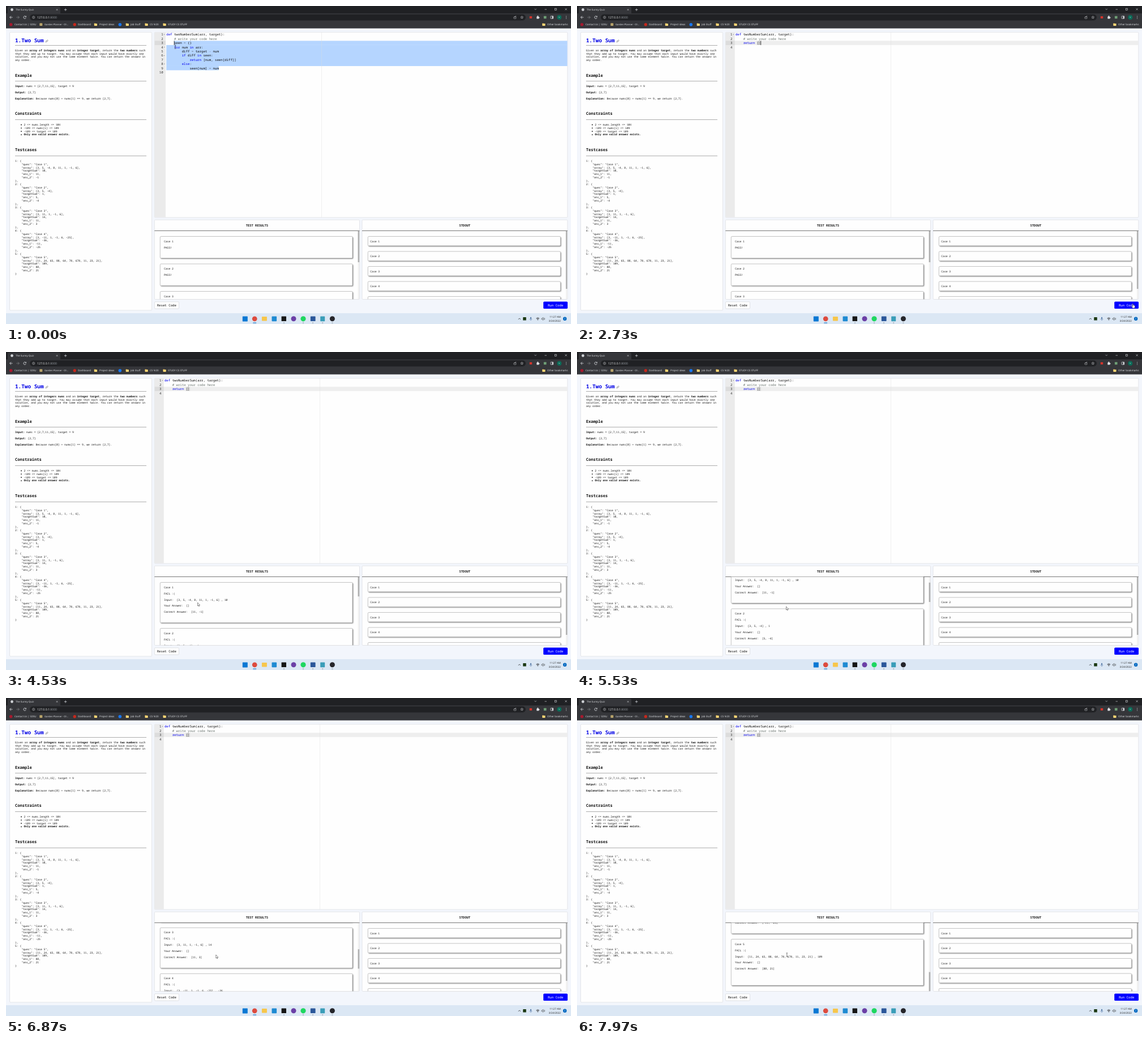
Animation, 998 px wide and 561 px high, one loop 8 s. Source, as an HTML page with a canvas:

```html
<!DOCTYPE html>
<html lang="en">
<head>
<meta charset="utf-8">
<title>Coding practice</title>
<style>
html, body { margin: 0; width: 100%; height: 100%; overflow: hidden; background: #f3f6fc; }
canvas { display: block; width: 998px; height: 561px; }
</style>
</head>
<body>
<canvas id="stage"></canvas>
<script>
const LOOP = 8000, W = 998, H = 561;
const MONO = '"Noto Sans Mono", "DejaVu Sans Mono", monospace';
const SANS = '"Open Sans", "Noto Sans", sans-serif';
const SMALL = 4.68, CODE = 5.72, ADV = CODE * 0.6, ROW = 7.42;

const canvas = document.getElementById('stage');
const ctx = canvas.getContext('2d');
const dpr = window.devicePixelRatio || 1;
canvas.width = W * dpr;
canvas.height = H * dpr;

const CASES = [
  { nums: '3, 5, -4, 8, 11, 1, -1, 6', sum: 10, ans: [11, -1] },
  { nums: '3, 5, -4', sum: 1, ans: [5, -4] },
  { nums: '3, 11, 1, -1, 6', sum: 14, ans: [11, 3] },
  { nums: '3, -11, 1, -1, 6, -25', sum: -36, ans: [-11, -25] },
  { nums: '11, 24, 65, 88, 64, 78, 678, 11, 23, 21', sum: 109, ans: [88, 21] }
];
const HEAD = ['def twoNumberSum(arr, target):', '    # write your code here'];
const SOLUTION = [...HEAD,
  '    seen = {}',
  '    for num in arr:',
  '        diff = target - num',
  '        if diff in seen:',
  '            return [num, seen[diff]]',
  '        else:',
  '            seen[num] = num',
  ''];
const TYPED = 'return []';
const KEYWORDS = /^(def|for|in|if|else|return)$/;

const DELETE_AT = 350, TYPE_AT = 550, KEY_MS = 80, BLUR_AT = 2800, RESULT_AT = 3500;
const WHEEL = [5421, 5830, 6241, 6829, 7250, 7640], WHEEL_MS = 180, NOTCH = 52, MAX_SCROLL = 305;
// time, x, y of the pointer
const PATH = [
  [0, 299, 72], [1350, 299, 72], [2100, 982, 527], [3450, 982, 527], [4250, 338.5, 442],
  [4700, 338.5, 442], [5300, 369.5, 449], [5600, 369.5, 449], [6000, 370.8, 453], [8000, 370.8, 453]
];

const ease = p => { p = Math.min(1, Math.max(0, p)); return p * p * (3 - 2 * p); };

function rect(x, y, w, h, fill) {
  ctx.fillStyle = fill;
  ctx.fillRect(x, y, w, h);
}
function round(x, y, w, h, r, fill, stroke, lw = 0.5) {
  ctx.beginPath();
  ctx.roundRect(x, y, w, h, r);
  if (fill) { ctx.fillStyle = fill; ctx.fill(); }
  if (stroke) { ctx.strokeStyle = stroke; ctx.lineWidth = lw; ctx.stroke(); }
}
function dot(x, y, r, fill) {
  ctx.beginPath();
  ctx.arc(x, y, r, 0, 7);
  ctx.fillStyle = fill;
  ctx.fill();
}
function line(points, color, lw = 0.6) {
  ctx.beginPath();
  points.forEach(([x, y], i) => i ? ctx.lineTo(x, y) : ctx.moveTo(x, y));
  ctx.strokeStyle = color;
  ctx.lineWidth = lw;
  ctx.stroke();
}
function poly(points, fill, stroke, lw = 0.5) {
  ctx.beginPath();
  points.forEach(([x, y]) => ctx.lineTo(x, y));
  ctx.closePath();
  ctx.fillStyle = fill;
  ctx.fill();
  if (stroke) { ctx.strokeStyle = stroke; ctx.lineWidth = lw; ctx.stroke(); }
}
// y is the middle of the capitals; drawn large and scaled down for exact advances
function text(s, x, y, { size = SMALL, color = '#111', bold = false, font = MONO, align = 'left' } = {}) {
  const k = 8;
  ctx.save();
  ctx.translate(x, y + size * 0.357);
  ctx.scale(1 / k, 1 / k);
  ctx.font = `${bold ? 'bold ' : ''}${size * k}px ${font}`;
  ctx.textRendering = 'geometricPrecision';
  ctx.textAlign = align;
  ctx.fillStyle = color;
  ctx.fillText(s, 0, 0);
  ctx.restore();
}
// parts between asterisks are bold
function rich(s, x, y) {
  s.split('*').forEach((part, i) => {
    text(part, x, y, { bold: i % 2 === 1 });
    x += part.length * SMALL * 0.6;
  });
}
const label = (s, x, y, color = '#e8eaed', size = 4.45, align = 'left') =>
  text(s, x, y, { color, size, align, font: SANS });

function folder(x, y) {
  round(x - 2.5, y - 2.3, 2.6, 2, 0.4, '#e0b34a');
  round(x - 2.5, y - 1.7, 5.2, 4, 0.4, '#fbd575');
}

function drawBrowser() {
  const ink = '#dfe1e5';
  rect(0, 0, W, 39.5, '#35363a');
  rect(0, 0, W, 13, '#202124');
  round(3, 1, 93, 14, [3, 3, 0, 0], '#35363a');
  dot(10.5, 6.5, 2.4, '#cfd2d6');
  label('The Sunny Quiz', 17, 6.5);
  line([[88.8, 5.2], [91.4, 7.8]], ink);
  line([[91.4, 5.2], [88.8, 7.8]], ink);
  line([[102.8, 6.5], [107.4, 6.5]], ink, 0.7);
  line([[105.1, 4.2], [105.1, 8.8]], ink, 0.7);

  line([[933.5, 4.8], [935.2, 6.5], [936.9, 4.8]], ink);
  line([[951.5, 6], [955, 6]], ink);
  ctx.strokeRect(969.3, 4.2, 3, 3);
  line([[987.5, 4.2], [990.7, 7.4]], ink);
  line([[990.7, 4.2], [987.5, 7.4]], ink);

  line([[11.5, 20], [6.7, 20]], ink, 0.8);
  line([[9, 17.6], [6.6, 20], [9, 22.4]], ink, 0.8);
  line([[18.4, 20], [23.4, 20]], '#7d8085', 0.8);
  line([[21, 17.6], [23.4, 20], [21, 22.4]], '#7d8085', 0.8);
  ctx.beginPath();
  ctx.arc(33.2, 20, 2.3, 0.4, 5.6);
  ctx.strokeStyle = ink;
  ctx.lineWidth = 0.8;
  ctx.stroke();
  poly([[35.8, 17.2], [35.8, 19.6], [33.4, 19.6]], ink);

  round(42, 14.8, 876, 10.6, 5.3, '#202124');
  ctx.beginPath();
  ctx.arc(48.7, 20, 2.1, 0, 7);
  ctx.strokeStyle = ink;
  ctx.lineWidth = 0.5;
  ctx.stroke();
  line([[48.7, 19.6], [48.7, 21.3]], ink, 0.6);
  rect(48.4, 18.5, 0.6, 0.6, ink);
  label('127.0.0.1', 55, 20, '#f1f3f4', 5.2);
  label(':8000', 76.8, 20, '#9aa0a6', 5.2);

  round(896.9, 19.2, 4, 3, 0.4, null, ink);
  line([[898.2, 20], [899.5, 18], [901.3, 18]], ink);
  poly(Array.from({ length: 10 }, (_, i) => {
    const r = i % 2 ? 1.1 : 2.5, a = i * Math.PI / 5 - Math.PI / 2;
    return [911.3 + r * Math.cos(a), 20.1 + r * Math.sin(a)];
  }), '#202124', ink);
  round(924.8, 18, 4.4, 4, 0.6, '#d0342c');
  round(937.3, 18.4, 4, 4, 0.5, ink);
  dot(939.3, 18, 1, ink);
  dot(941.5, 20.4, 1, ink);
  round(949.9, 17.8, 4.6, 4.4, 0.5, '#6f9f76');
  round(962, 17.8, 4.6, 4.4, 0.4, null, ink, 0.7);
  rect(964.6, 17.8, 2, 4.4, ink);
  dot(977.3, 20, 4, '#0b6b58');
  label('v', 977.3, 19.7, '#d9efe9', 4.2, 'center');
  [18, 20, 22].forEach(y => dot(989.6, y, 0.55, ink));

  const y = 32.7;
  dot(8.7, y, 2.7, '#a6192e');
  label('Contact Us | SDSU', 15, y);
  round(59.3, y - 2.4, 5, 4.8, 0.8, '#b8a36a');
  label('Garden Planner - Ol...', 68, y, '#e8eaed', 4.2);
  dot(121.3, y, 2.7, '#c5281c');
  label('Dashboard', 127, y);
  dot(201.3, y, 2.8, '#1877f2');
  [[158.3, 'Project ideas', 165], [214.2, 'Job Stuff', 220], [248, 'CS 9/20', 254],
   [280, 'STUDY CS STUFF', 286], [949.8, 'Other bookmarks', 956]].forEach(([fx, s, tx]) => {
    folder(fx, y);
    label(s, tx, y);
  });
}

function panel(x, y, w, h) {
  round(x, y, w, h, 1.5, '#fefefe', '#d5d7dc', 0.6);
}
function heading(s, y, ruleY) {
  text(s, 16, y, { size: 7.08, bold: true });
  rect(16, ruleY - 0.35, 232, 0.7, '#8d8d8d');
}

function drawProblem() {
  panel(6.5, 46.3, 251, 490.5);
  text('1.Two Sum', 16, 60.4, { size: 9.36, bold: true, color: '#0000e6' });
  ctx.save();
  ctx.translate(72, 62);
  ctx.rotate(-0.7);
  round(-2.7, -0.9, 3, 1.8, 0.9, null, '#666', 0.5);
  round(-0.3, -0.9, 3, 1.8, 0.9, null, '#666', 0.5);
  ctx.restore();
  rect(16, 69.2, 232, 0.7, '#8d8d8d');
  ['Given an *array of integers nums* and an *integer target*, return the *two numbers* such',
   'that they add up to target. You may assume that each input would have exactly one',
   'solution, and you may not use the same element twice. You can return the answer in',
   'any order.'].forEach((s, i) => rich(s, 16, 78 + i * 5.86));
  heading('Example', 122, 132.6);
  rich('*Input:* nums = [2,7,11,15], target = 9', 16, 141.4);
  rich('*Output:* [2,7]', 16, 152.4);
  rich('*Explanation:* Because nums[0] + nums[1] == 9, we return [2,7].', 16, 163.3);
  heading('Constraints', 189.6, 200.4);
  ['2 <= nums.length <= 104', '-109 <= nums[i] <= 109', '-109 <= target <= 109',
   '*Only one valid answer exists.*'].forEach((s, i) => {
    dot(27, 209.5 + i * 5.86, 0.9, '#111');
    rich(s, 31.5, 209.2 + i * 5.86);
  });
  heading('Testcases', 253.2, 264.3);
  CASES.forEach((c, i) => {
    const rows = [
      `${i + 1}: {`,
      `    "ques": "Case ${i + 1}",`,
      `    "array": [${c.nums}],`,
      `    "targetSum": ${c.sum},`,
      `    "ans_1": ${c.ans[0]},`,
      `    "ans_2": ${c.ans[1]}`,
      i < 4 ? '},' : '}'];
    rows.forEach((s, j) => text(s, 16, 273.2 + (i * 7 + j) * 5.857));
  });
}

function codeLine(s, x, y) {
  for (const m of s.matchAll(/#.*|\w+|[^\w\s]/g)) {
    const w = m[0];
    const color = w[0] === '#' ? '#69736e' : KEYWORDS.test(w) ? '#0000ee' : /^[=-]$/.test(w) ? '#687687' : '#111';
    text(w, x + m.index * ADV, y, { size: CODE, color });
  }
}

function drawEditor(t) {
  const full = t < DELETE_AT;
  const keys = Math.max(0, Math.min(TYPED.length, Math.floor((t - TYPE_AT) / KEY_MS) + 1));
  let typed = TYPED.slice(0, keys);
  if (typed.endsWith('[')) typed += ']';
  const lines = full ? SOLUTION : [...HEAD, '    ' + typed, ''];
  const gutter = full ? 282 : 278.8, x0 = full ? 283.2 : 279.9;
  const top = 46.6, rowTop = i => top + i * ROW, active = rowTop(2);

  panel(262.3, 46.3, 729.5, 326.7);
  rect(262.6, top, gutter - 262.6, 326.1, '#ebebeb');
  rect(262.6, active, gutter - 262.6, ROW, '#dcdcdc');
  if (full) {
    const blue = '#b5d5ff', in4 = x0 + 4 * ADV;
    rect(in4, active, 991.5 - in4, ROW, blue);
    rect(x0, rowTop(3), 991.5 - x0, ROW * 5, blue);
    rect(x0, rowTop(8), 27 * ADV, ROW, blue);
  } else {
    rect(gutter, active, 991.5 - gutter, ROW, '#eeeeee');
  }
  rect(x0 + 80 * ADV - 0.2, top, 0.4, 326.1, '#dcdcdc');
  lines.forEach((s, i) => {
    const y = 50.3 + i * ROW;
    text(String(i + 1), gutter - 4.4, y, { size: CODE, color: '#333', align: 'right' });
    if (s.endsWith(':')) {
      const fx = gutter - 2.3;
      poly([[fx - 1, y - 0.5], [fx + 1, y - 0.5], [fx, y + 0.8]], '#777');
    }
    codeLine(s, x0, y);
  });
  if (!full && typed.includes(']')) {
    [11, 12].forEach(c => round(x0 + c * ADV, active + 0.3, ADV, ROW - 0.6, 0.6, null, '#c0c0c0', 0.4));
  }
  if (t < BLUR_AT) {
    const col = full ? 4 : 4 + keys;
    rect(x0 + col * ADV - 0.2, active, 0.8, ROW, '#111');
  }
}

function card(x, y, w, h) {
  ctx.save();
  ctx.shadowColor = 'rgba(0,0,0,0.5)';
  ctx.shadowBlur = 2 * dpr;
  ctx.shadowOffsetX = ctx.shadowOffsetY = 1.2 * dpr;
  round(x, y, w, h, 1.5, '#fff');
  ctx.restore();
  round(x, y, w, h, 1.5, '#fefefe', '#8f8f8f', 0.5);
}

// a titled box with a scrolled body and a scroll bar
function scrollPane(x, w, title, thumbY, thumbH, body) {
  panel(x, 377.3, w, 140.2);
  text(title, x + w / 2, 387, { size: 5.46, bold: true, align: 'center' });
  rect(x, 396, w, 0.8, '#555');
  ctx.save();
  ctx.beginPath();
  ctx.rect(x, 396.8, w, 120.4);
  ctx.clip();
  body();
  rect(x + w - 2.9, 396.8, 2.6, 120.4, '#f1f1f1');
  rect(x + w - 2.9, thumbY, 2.6, thumbH, '#b0b0b0');
  ctx.restore();
}

function drawResults(t, scroll) {
  const failed = t >= RESULT_AT;
  const pitch = failed ? 81 : 48.5;
  const thumb = failed ? 34.2 : 55;
  scrollPane(262.3, 362.2, 'TEST RESULTS', 397 + scroll * 0.2836, thumb, () => {
    CASES.forEach((c, i) => {
      const y = 406.5 + i * pitch - scroll;
      const rows = failed
        ? [`Case ${i + 1}`, 'FAIL :(', `Input:  [${c.nums}] , ${c.sum}`, 'Your Answer:  []',
           `Correct Answer:  [${c.ans.join(', ')}]`]
        : [`Case ${i + 1}`, 'PASS!'];
      card(272.3, y, 339.7, failed ? (i === 4 ? 81.5 : 71) : 38.3);
      rows.forEach((s, j) => text(s, 279, y + 8.5 + j * 10.92));
    });
  });
  scrollPane(629, 362.8, 'STDOUT', 397, 102, () => {
    CASES.forEach((c, i) => {
      const y = 406.5 + i * 26.5;
      card(639.3, y, 340, 16.5);
      text(`Case ${i + 1}`, 643.3, y + 8.4);
    });
  });
}

function drawButtons() {
  round(262.3, 521.8, 43.2, 12.2, 1.6, '#fefefe', '#cfd1d6', 0.6);
  text('Reset Code', 283.8, 528, { size: CODE, align: 'center' });
  round(949.2, 521.6, 42.8, 12.4, 1.6, '#0000ff');
  text('Run Code', 970.6, 528, { size: CODE, color: '#fff', align: 'center' });
}

function drawTaskbar() {
  const y = 551.8, ink = '#222';
  rect(0, 542, W, 19, '#dbe7f4');
  round(417.8, 547.4, 9, 9, 0.6, '#0a78d4');
  dot(439.2, y, 4.4, '#dd4b3e');
  round(451.9, 548, 9, 7.6, 0.8, '#f7c64b');
  round(469.5, 547.6, 8.6, 8.6, 1, '#1f8ad2');
  round(486.6, 547.6, 8.4, 8.4, 0.6, '#161616');
  dot(508, y, 4.5, '#6b3fa6');
  dot(525, y, 4.6, '#1ed760');
  round(537.8, 547.6, 8.8, 8.4, 0.8, '#2b579a');
  round(555.2, 547.4, 8, 8.8, 0.8, '#3a9db8');
  dot(576.4, y, 4.5, '#25252a');
  round(436.2, 558.4, 6, 1.1, 0.5, '#0067c0');
  [491, 525, 542, 559.2, 576.4].forEach(x => round(x - 1.2, 558.4, 2.4, 1, 0.5, '#868d94'));

  line([[904.8, 553], [906.9, 550.9], [909, 553]], ink, 0.7);
  round(913.2, 549, 5.6, 5.6, 0.4, '#1c3a14');
  round(926.1, 548.8, 1.8, 3.6, 0.9, '#4a6fa0');
  line([[925, 551.6], [925.4, 553.2], [927, 553.8], [928.6, 553.2], [929, 551.6]], '#4a6fa0', 0.5);
  line([[927, 553.8], [927, 555]], '#4a6fa0', 0.5);
  [1.5, 2.8, 4].forEach(r => {
    ctx.beginPath();
    ctx.arc(939.3, 554, r, -2.35, -0.79);
    ctx.strokeStyle = ink;
    ctx.lineWidth = 0.7;
    ctx.stroke();
  });
  dot(939.3, 553.8, 0.6, ink);
  poly([[946, 551], [947.2, 551], [948.8, 549.4], [948.8, 554.4], [947.2, 552.8], [946, 552.8]], '#dbe7f4', ink);
  [1.4, 2.8].forEach(r => {
    ctx.beginPath();
    ctx.arc(948.8, 551.9, r, -0.8, 0.8);
    ctx.stroke();
  });
  label('11:27 AM', 979.8, 548.6, ink, 4.5, 'right');
  label('3/24/2022', 979.8, 555.2, ink, 4.5, 'right');
  dot(987.1, y, 3.2, '#0067c0');
  label('2', 987.1, y, '#fff', 4, 'center');
}

function pointerAt(t) {
  const i = Math.max(1, PATH.findIndex(p => p[0] > t));
  const [a, b] = [PATH[i - 1], PATH[i]];
  const p = ease((t - a[0]) / (b[0] - a[0]));
  return [a[1] + (b[1] - a[1]) * p, a[2] + (b[2] - a[2]) * p];
}

function drawPointer(t, scroll) {
  const [x, y] = pointerAt(t);
  const inEditor = x > 283 && y < 373;
  ctx.save();
  ctx.translate(x, y);
  if (inEditor || scroll > 300) {
    line([[-1.3, -3.4], [0, -3], [1.3, -3.4]], '#222', 0.5);
    line([[0, -3.2], [0, 3.2]], '#222', 0.6);
    line([[-1.3, 3.4], [0, 3], [1.3, 3.4]], '#222', 0.5);
  } else if (x > 949 && y > 521 && y < 534) {
    poly([[-0.6, -1.6], [0.5, -1.6], [0.5, 1], [3.2, 1.6], [3.6, 2.4], [3, 6], [-0.4, 6], [-2.4, 3], [-1.8, 2.4], [-0.6, 3.3]],
      '#fff', '#222', 0.5);
  } else {
    poly([[0, 0], [0, 6], [1.3, 4.8], [2.2, 6.8], [3.1, 6.4], [2.2, 4.5], [4.1, 4.4]], '#fff', '#222', 0.5);
  }
  ctx.restore();
}

function draw(t) {
  const scroll = Math.min(MAX_SCROLL, WHEEL.reduce((s, at) => s + NOTCH * ease((t - at) / WHEEL_MS), 0));
  ctx.setTransform(dpr, 0, 0, dpr, 0, 0);
  rect(0, 0, W, H, '#f3f6fc');
  drawBrowser();
  drawProblem();
  drawEditor(t);
  drawResults(t, scroll);
  drawButtons();
  drawTaskbar();
  drawPointer(t, scroll);
}

const start = performance.now();
function tick() {
  draw((performance.now() - start) % LOOP);
  requestAnimationFrame(tick);
}
tick();
</script>
</body>
</html>
```
